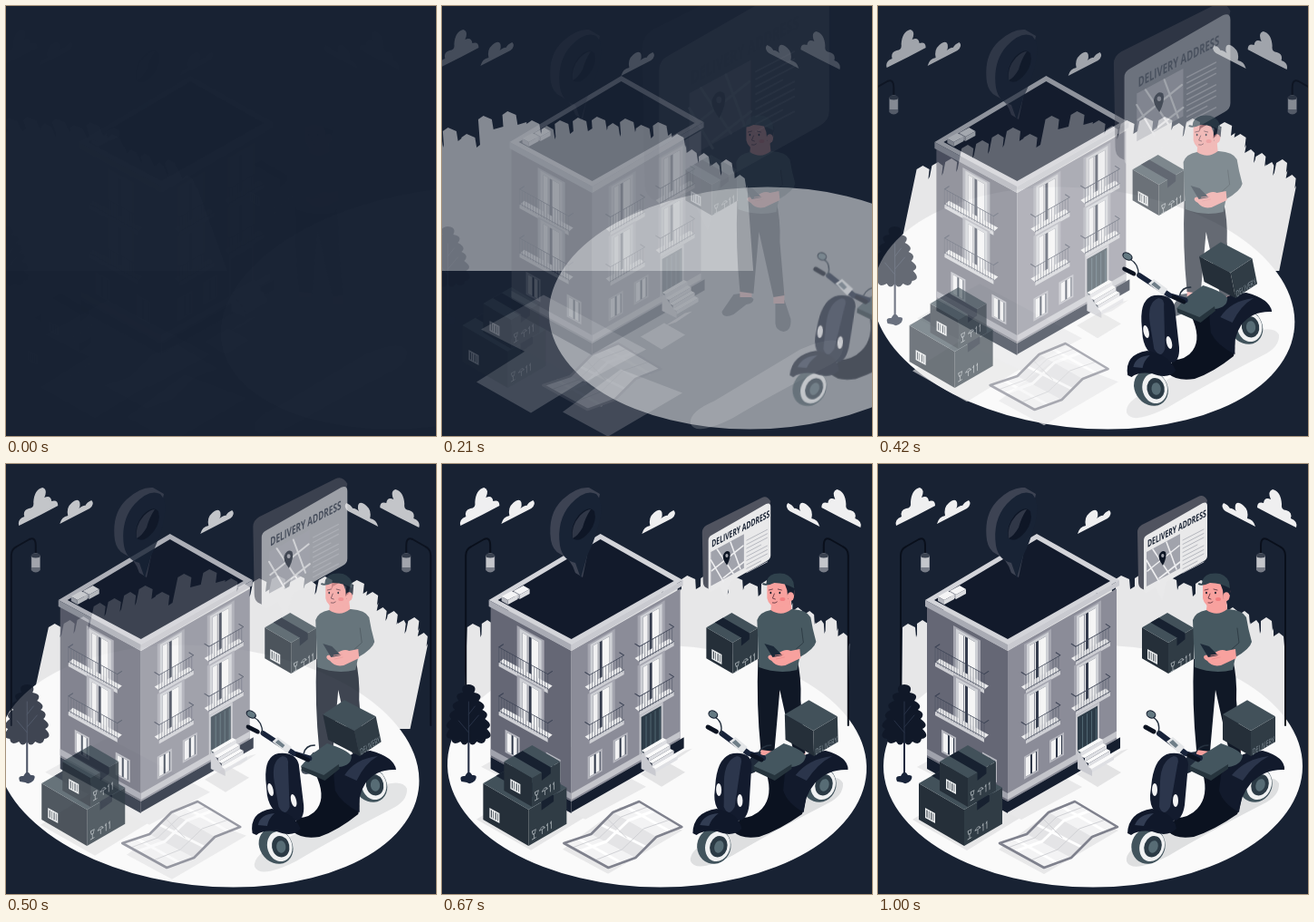
Write an HTML page that moves like this. It is 474 by 474 pixels and loops after 1040 ms.

```html
<!DOCTYPE html>
<html lang="en">
<head>
<meta charset="utf-8">
<title>Delivery address</title>
<style>
html, body { margin: 0; width: 100%; height: 100%; overflow: hidden; background: #182233; }
svg { display: block; width: 100vw; height: 100vh; }
text { font-family: "Open Sans", "Noto Sans", sans-serif; }
</style>
</head>
<body>
<svg id="stage" viewBox="0 0 474 474"></svg>
<script>
const NAVY = '#182233', INK = '#0d1524', TEAL = '#44565f', SKIN = '#f8a19e';
const LIGHT = '#d3d4d9', SLATE = '#252f39';

const shape = (d, fill, extra = '') => `<path d="${d}" fill="${fill}" ${extra}/>`;
const line = (d, color, width = 1) =>
  `<path d="${d}" fill="none" stroke="${color}" stroke-width="${width}" stroke-linecap="round" stroke-linejoin="round"/>`;
const poly = (points, fill, extra = '') => `<polygon points="${points}" fill="${fill}" ${extra}/>`;
const rect = (x, y, w, h, fill) => `<rect x="${x}" y="${y}" width="${w}" height="${h}" fill="${fill}"/>`;
const oval = (x, y, rx, ry, fill, extra = '') =>
  `<ellipse cx="${x}" cy="${y}" rx="${rx}" ry="${ry}" fill="${fill}" ${extra}/>`;
const place = (transform, body) => `<g transform="${transform}">${body}</g>`;
const mirror = body => place('matrix(-1 0 0 1 474 0)', body);

// Isometric carton; (x, y) is the front corner of its lid.
function carton(x, y, w, d, h, mark = '', tape = true) {
  const k = .58, lx = x - w, ly = y - k * w, rx = x + d, ry = y - k * d;
  const onLid = a => [x + a * d, y - k * a * d];
  const [ax, ay] = onLid(.34), [bx, by] = onLid(.66);
  return poly([lx, ly, x, y, x, y + h, lx, ly + h], SLATE) +
    poly([x, y, rx, ry, rx, ry + h, x, y + h], '#303c45') +
    poly([lx, ly, x, y, rx, ry, lx + d, ly - k * d], '#42515a') +
    (tape ? poly([ax - w, ay - k * w, ax, ay, ax, ay + 9, bx, by + 7, bx, by, bx - w, by - k * w], '#172130') : '') +
    mark;
}

function barcode(x, y) {
  let bars = rect(0, 0, 11, 11, '#eef0f1');
  for (let i = 0; i < 4; i++) bars += rect(1.5 + i * 2.4, 1.5, i % 2 ? .6 : 1, 8, SLATE);
  return place(`matrix(1 .55 0 1 ${x} ${y})`, bars);
}

const handling = (x, y) => place(`matrix(1 -.58 0 1 ${x} ${y})`,
  line('M0 0h4l-1 4h-2zM2 4v5M0 9h4M8 4q3-5 6 0zM11 4v5M17 9V1l-1 2M21 9V1l-1 2', '#aab2b7', .8));

function skyline() {
  const towers = [[27, 176], [43, 172], [57, 168], [72, 153], [87, 148], [103, 141], [118, 134],
    [138, 141], [158, 121], [185, 116], [211, 126], [227, 132], [242, 126], [262, 123], [283, 122],
    [300, 129], [314, 124], [331, 131], [350, 128], [370, 141], [385, 158], [398, 162], [411, 172],
    [422, 169], [436, 186]];
  let d = 'M26 292';
  towers.forEach(([x, y], i) => {
    const next = i + 1 < towers.length ? towers[i + 1][0] : 449;
    const edge = Math.min(x + 15, next - 2);
    d += `L${x} ${y + 4}L${x + 6} ${y}L${edge} ${y + 4}L${edge + 1} ${y + 15}L${next} ${y + 12}`;
  });
  return shape(d + 'L449 292Z', '#e7e7e8');
}

const bigCloud = 'M20 68Q18 61 26 58Q24 51 31 49Q37 49 36 42Q37 28 46 26Q52 28 48 37Q55 34 56 41Q63 39 63 46L44 56Z';
const smallCloud = 'M65 66Q67 58 74 57Q72 48 78 43Q85 37 87 42Q88 47 86 49Q92 45 93 46Q95 42 100 40Q104 44 98 49Z';
function clouds() {
  const c = '#efeff0', big = shape(bigCloud, c), small = shape(smallCloud, c);
  return big + small + place('translate(155 11)', small) +
    place('translate(7 2)', mirror(big)) + place('translate(7 3)', mirror(small));
}

const lamp = line('M25 288V101Q25 94 31 91L45 83Q52 80 52 90V99', '#090f1b', 2) +
  shape('M47 101Q52 95 57 101V117Q52 122 47 117Z', '#777c87') +
  rect(47.5, 101, 9, 13, '#c4c6cb') + oval(52, 101, 5, 2.5, '#3a4250');

const shadows = poly('38,392 98,354 160,388 98,426', '#e6e6e7') +
  poly('43,334 112,296 225,356 158,392', '#e8e8e9') +
  poly('133,425 197,378 265,404 183,452', '#e8e8e9') +
  poly('219,342 245,327 268,340 242,356', '#e3e3e4') +
  poly('246,330 268,316 276,314 258,326', '#e5e5e6') +
  shape('M274 438Q272 425 300 413L395 356Q435 338 442 352Q443 366 424 375Q360 408 320 432Q280 452 274 438Z', '#dedfe0');

function tallWindow(u, v) {
  return rect(u - 1, v - 2, 30, 48, '#a5a6b0') + rect(u + 2, v, 24, 46, '#ced0d5') +
    rect(u + 5, v + 3, 18, 43, '#343b4c') + rect(u + 5, v + 3, 7, 43, '#f0f0f1') +
    rect(u + 15, v + 3, 8, 43, '#f5f5f5') + rect(u + 10, v + 3, 1, 43, '#8d909b');
}

function balcony(u, v, w, out) {
  let bars = '';
  for (let i = 0; i <= w; i += 3) bars += `M${u + out + i} ${v - 10}v17`;
  return shape(`M${u} ${v}h${w}l${out} 7h${-w}Z`, '#eeeeef') +
    rect(u + out, v + 7, w, 4, '#cfd0d5') +
    line(bars, '#4a5061', .45) +
    line(`M${u} ${v - 16}l${out} 6h${w}l${-out} -6M${u + out} ${v + 6}h${w}`, '#3b4254', .8);
}

const smallWindow = (u, v) => rect(u, v, 16, 25, '#b7b8c0') + rect(u + 2, v + 2, 12, 21, '#2c3546') +
  rect(u + 2, v + 2, 5, 21, '#f2f2f3') + rect(u + 9, v + 2, 4, 21, '#f2f2f3');

function stairs() {
  let steps = poly('220,316 236,338 236,344 220,336', '#c9cad0');
  for (let i = 0; i < 4; i++) {
    const x = 220 + i * 4, y = 316 + i * 6;
    steps += poly([x, y, x + 24, y - 14, x + 28, y - 12, x + 4, y + 2], '#fbfbfb') +
      poly([x + 4, y + 2, x + 28, y - 12, x + 28, y - 8, x + 4, y + 6], '#dedfe3');
  }
  return steps;
}

function building() {
  let left = rect(0, 0, 89, 166, '#656775') + rect(0, 157, 89, 7, '#a0a2ac') + rect(0, 166, 89, 13, '#151e2f');
  let right = rect(0, 0, 120, 166, '#8b8c98') + rect(0, 157, 120, 7, '#c4c5cb') + rect(0, 166, 124, 12, '#151e2f');
  for (const v of [7, 61]) left += tallWindow(30, v) + balcony(14, v + 43, 54, -5);
  for (const v of [5, 60]) for (const u of [19, 74]) right += tallWindow(u, v) + balcony(u - 4, v + 43, 38, 5);
  left += smallWindow(16, 127) + smallWindow(61, 127);
  right += smallWindow(18, 127) + smallWindow(46, 125) + rect(75, 114, 26, 44, '#c5c6cc') + rect(77, 117, 22, 41, '#2d3c48');
  for (let u = 82; u < 98; u += 5) right += rect(u, 119, .8, 37, '#59707c');
  const vent = poly('0,6 11,0 18,4 7,10', '#f5f5f6') + poly('0,6 7,10 7,15 0,11', '#b7b9c0') +
    poly('7,10 18,4 18,9 7,15', '#dcdde0');
  return place('matrix(1 .55 0 1 54 157)', left) + place('matrix(1 -.57 0 1 143 206)', right) + stairs() +
    poly('52,150 175,77 266,128 143,199', LIGHT) +
    poly('52,150 143,199 143,206 52,157', '#a9abb4') + poly('143,199 266,128 266,134 143,206', '#c9cad0') +
    poly('62,150 175,83 256,129 143,193', '#121a2b') +
    place('translate(79 134)', vent) + place('translate(66 140)', vent);
}

const pin = shape('M120 84Q116 55 133 39Q148 25 162 26L174 33L155 125L147 120Q142 104 130 99Q122 95 120 84Z', '#3d4353') +
  shape('M130 90Q126 62 142 44Q158 27 170 33Q179 42 173 66Q167 88 160 101L153 126L147 109Q133 106 130 90Z', '#182335') +
  shape('M144 82Q141 68 151 56Q162 45 168 52Q171 63 163 74Q152 88 144 82Z', '#0e1626') +
  shape('M144 82Q142 68 152 57Q159 50 164 50Q158 59 155 70Q150 79 144 82Z', '#303747');

const tree = line('M29 258V348', '#19233a', 2) +
  shape('M29 243Q39 244 35 252Q46 254 40 261Q50 266 44 271Q53 275 47 281Q57 288 49 292Q58 301 48 303Q46 311 38 306Q33 313 29 306Q24 313 20 306Q11 311 10 303Q0 302 8 292Q0 289 10 281Q4 276 14 271Q7 265 18 261Q12 253 23 252Q19 244 29 243Z', '#101828') +
  line('M29 262V346M29 290L40 277M29 296L18 283M29 276L36 267', '#283247', 1) +
  shape('M21 350Q18 343 25 344Q29 336 33 343Q40 342 36 349Q31 354 27 351Z', '#19243a');

const boxes = carton(95, 381, 50, 42, 40, barcode(52, 379) + handling(99, 405)) +
  carton(99, 346, 31, 31, 32, barcode(75, 347) + handling(102, 362));

const map = poly('134,418 164,408 188,384 217,372 264,400 236,411 213,434 183,445', '#f3f3f4') +
  poly('164,408 188,384 236,411 213,434', '#e4e4e6') +
  line('M151 427L181 416L205 393L234 382M176 398L224 422M150 413L198 440M203 378L251 405', '#fff', 3) +
  line('M143 423L173 412L197 389L226 378M168 437L198 425L222 402L251 392M182 391L203 412', '#d0d1d5', 1) +
  line('M134 418L164 408L188 384L217 372L264 400L236 411L213 434L183 445Z', '#7f818d', 2.6);

const cardBack = shape('M286 75Q286 70 291 67L353 36Q359 33 363 40L360 55L296 140L290 137Q287 135 287 130Z', '#50535f') +
  shape('M293 84Q293 80 297 78L358 43Q363 41 363 46V101Q363 105 359 107L318 130L313 150L306 136L298 141Q293 143 293 138Z', '#e9e9ea');

function cardInfo() {
  let rows = '';
  for (let i = 0; i < 9; i++) {
    const [x, y] = i % 4 == 3 ? [352, 75.5] : [359, 72];
    rows += `M336 ${84 + i * 4.5}L${x} ${y + i * 4.5}`;
  }
  return place('matrix(.635 -.335 0 1 297 92)', `<text font-size="10.8" font-weight="700" fill="${NAVY}">DELIVERY ADDRESS</text>`) +
    poly('296,97 333,77 333,115 296,135', '#a1a3ac') +
    line('M297 118L332 90M303 94L321 121M318 86L329 116M296 106L310 130M310 126L333 108', '#eeeef0', 1.6) +
    shape('M314 112Q308 104 310 100Q313 94 317 97Q319 102 314 112Z', INK) + oval(313.8, 101, 1.6, 2, '#a1a3ac') +
    line(rows, '#b6b8bf', 1);
}

const person =
  shape('M344 318L357 316L366 323Q366 328 358 329L344 340Q332 345 331 337Z', '#1f2a3a') +
  shape('M390 326L400 324L407 345Q408 358 399 359Q391 358 390 350Z', '#1f2a3a') +
  poly('351,308 364,308 364,321 351,321', SKIN) + poly('388,315 400,315 400,328 388,328', SKIN) +
  shape('M348 215H391Q396 235 395 260L400 319L388 321L372 249L366 317L351 315Q346 265 348 215Z', '#101826') +
  carton(320, 197, 29, 28, 34, barcode(297, 204) + handling(323, 220)) +
  shape('M347 172Q350 163 362 161L386 160Q402 161 406 169Q408 182 412 196Q410 204 394 213L391 227Q370 232 349 224Z', '#475961') +
  line('M396 181L398 197L390 204', '#2f3d46', 1) +
  shape('M363 150L384 150L385 160Q374 169 362 161Z', SKIN) +
  shape('M358 137Q357 126 372 126L385 132Q391 140 386 149Q380 158 371 158Q360 158 358 148Z', SKIN) +
  shape('M377 131L389 133L388 144L381 149L380 139Z', '#172131') + oval(384, 146, 3.6, 4.8, SKIN) +
  shape('M357 132Q357 124 366 121Q382 118 387 130L388 137Q378 131 366 131Q358 135 353 133Q352 130 357 132Z', '#2f414c') +
  line('M360 139l4 -1M370 138l4 1M366 143l-2 5 3 1M364 153q3 1 5 -1', '#72424b', 1) +
  oval(362, 142, .9, 1.2, INK) + oval(372, 142, .9, 1.2, INK) + oval(375, 149, 3, 2, '#f27e80') +
  shape('M394 204L384 206Q378 203 370 209L360 211Q357 214 363 217Q368 224 378 222L395 214Z', SKIN) +
  poly('355,198 365,201 375,211 364,213', '#1c2938') + line('M367 211l9 -1M368 215l9 -2', '#e98d8c', .8);

const wheel = (x, y) => place(`translate(${x} ${y}) rotate(20)`,
  oval(0, 0, 18.5, 20, '#42545d') + oval(4, -1, 13.5, 17, '#f0f1f2') +
  oval(5, -1, 9.5, 12, '#2b3a45') + oval(5.5, -1, 5, 7, '#576c75'));

const scooter = wheel(416, 353) +
  shape('M328 390Q343 390 352 380Q365 366 358 341L400 338Q404 370 396 386Q370 404 348 411Q328 414 320 405Z', '#0b1220') +
  shape('M378 343Q391 317 424 316Q449 323 448 337Q426 336 411 352Q399 366 398 384Q380 374 376 360Z', '#121a2c') +
  shape('M390 343Q405 325 431 322Q415 330 402 349Z', '#2b354b') +
  carton(411, 294, 31, 27, 28, '', false) +
  place('matrix(.62 -.37 0 1 412.5 321)', '<text font-size="9" fill="#84919a">DELIVERY</text>') +
  shape('M357 321L378 308Q399 315 402 322Q400 332 386 334L367 346L344 333Z', TEAL) +
  shape('M344 333L367 343L386 331L386 336L367 349L344 338Z', '#26343d') +
  wheel(298, 421) +
  shape('M302 348Q306 322 322 319Q341 317 342 331L338 376Q335 397 320 392Q299 386 300 365Z', '#131b2e') +
  shape('M311 350Q312 327 326 322Q333 322 330 332L322 378Q315 390 310 378Z', '#2c364c') +
  shape('M275 407Q276 384 302 380Q326 384 329 402Q319 412 302 405Q287 403 279 409Z', '#10182a') +
  shape('M283 398Q288 386 304 385Q296 391 293 399Z', '#323d53') +
  oval(305, 359, 3, 7, '#f4f4f5') + oval(328, 371, 3, 7, '#f4f4f5') +
  line('M310 297L339 319L355 324', '#18233a', 6) +
  line('M295 290L304 295M343 321L353 326', '#0c1321', 5) +
  line('M303 279Q312 284 309 297M350 319Q354 310 364 310', '#25313f', 1.4) +
  oval(301, 276, 5, 3.8, '#647982', 'transform="rotate(25 301 276)" stroke="#182233" stroke-width="1.2"') +
  poly('318,306 325,301 338,312 332,319', '#e4e6e8') + poly('321,307 325,304 331,310 328,313', '#6f7e88');

// Ease with a slight overshoot: cubic-bezier(.36, -.01, .5, 1.38).
function ease(x) {
  if (x >= 1) return 1;
  const curve = (s, a, b) => 3 * (1 - s) ** 2 * s * a + 3 * (1 - s) * s * s * b + s ** 3;
  let lo = 0, hi = 1;
  for (let i = 0; i < 24; i++) {
    const mid = (lo + hi) / 2;
    if (curve(mid, .36, .5) < x) lo = mid; else hi = mid;
  }
  return curve(lo, -.01, 1.38);
}

const slide = (dx, dy = 0) => t => {
  const p = ease(t);
  return [`translate(${dx * (1 - p)} ${dy * (1 - p)})`, p];
};

// Shrinks to size around (x, y) while fading in late.
const zoom = (extra, power, x, y) => t => {
  const p = ease(t), scale = (1 + extra * (1 - p)) ** power;
  return [`translate(${x} ${y}) scale(${scale}) translate(${-x} ${-y})`, p * p];
};

// Skewed rush from one side that wobbles to rest around height cy.
const rush = (side, cy) => t => {
  let shift = 0, skew, alpha = 1;
  if (t < .6) {
    const p = ease(t / .6);
    shift = 237 * (1 - p);
    skew = -20 + 30 * p;
    alpha = p;
  } else if (t < .8) skew = 10 - 12 * ease((t - .6) / .2);
  else skew = -2 + 2 * ease((t - .8) / .2);
  return [`translate(${side * shift} ${cy}) skewX(${side * skew}) translate(0 ${-cy})`, alpha];
};

const STEP = 28.4;
const layers = [
  [skyline(), rush(-1, 207)],
  [oval(237, 333, 231, 133.5, '#fafafa'), rush(1, 333)],
  [lamp, slide(-95)],
  [mirror(lamp), slide(95)],
  [clouds(), slide(-STEP)],
  [shadows, slide(0, STEP)],
  [building(), slide(STEP)],
  [pin, slide(0)],
  [tree, slide(-STEP)],
  [boxes, slide(-STEP)],
  [map, slide(-STEP)],
  [cardBack, zoom(.8, 2, 325, 92)],
  [cardInfo(), zoom(1.05, 1, 324, 98)],
  [person, slide(-STEP)],
  [scooter, rush(1, 355)]
];

const stage = document.getElementById('stage');
stage.innerHTML = rect(0, 0, 474, 474, NAVY) + layers.map(([body]) => `<g>${body}</g>`).join('');
const groups = [...stage.querySelectorAll(':scope > g')];

const LOOP = 1040, RATE = .024, LEAD = 29;
function draw(ms) {
  let tick = Math.floor((ms + 5) * RATE);
  if (Math.round(tick / RATE / 10) * 10 > ms) tick--;
  if (tick < 2) tick = 0;
  const t = Math.min(1, (tick / RATE + LEAD) / 1000);
  groups.forEach((g, i) => {
    const [transform, alpha] = layers[i][1](t);
    g.setAttribute('transform', transform);
    g.setAttribute('opacity', Math.max(0, Math.min(1, alpha)));
  });
}

const start = performance.now();
function run() {
  draw((performance.now() - start) % LOOP);
  requestAnimationFrame(run);
}
run();
</script>
</body>
</html>
```
